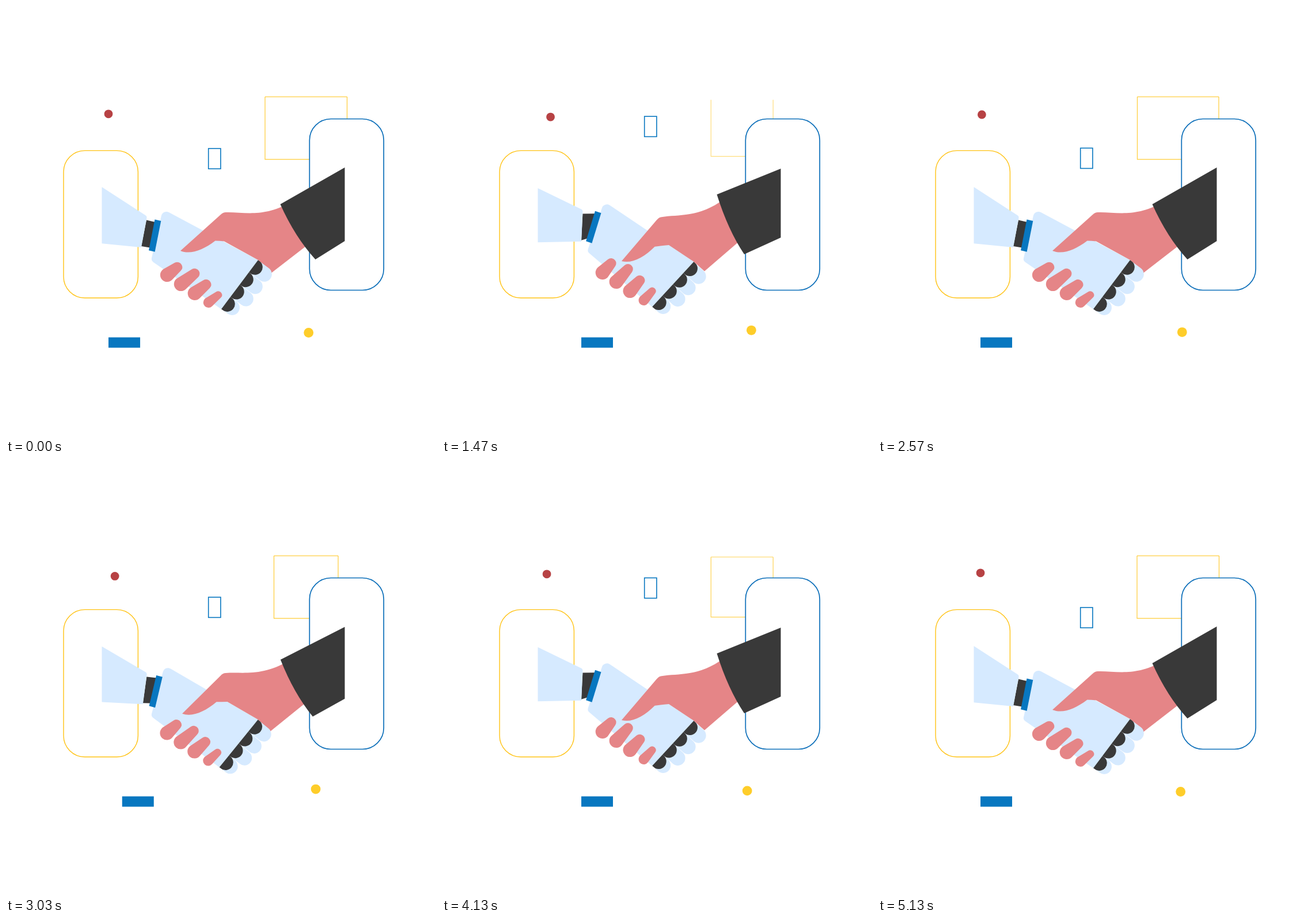
Recreate the animation shown at these times as an HTML page with a canvas. Size 747 px wide and 750 px high, loop 5.21 s.

```html
<!DOCTYPE html>
<html lang="en">
<head>
<meta charset="utf-8">
<title>Handshake</title>
<style>
html, body { margin: 0; width: 100%; height: 100%; overflow: hidden; background: #fff; }
canvas { display: block; width: 747px; height: 750px; }
</style>
</head>
<body>
<canvas id="stage" width="747" height="750"></canvas>
<script>
const ctx = document.getElementById('stage').getContext('2d');
const LOOP = 5210, FPS = 30, LAST = 154;
const LIGHT = '#d6eaff', DARK = '#393939', SKIN = '#e58587';
const BLUE = '#0877c0', LINE = '#0b6eb9', GOLD = '#ffc315';

const ramp = (f, start, length) => {
  const s = Math.min(1, Math.max(0, (f - start) / length));
  return s * s * (3 - 2 * s);
};

// Two identical swings: up from `rise`, back down from `fall`, then rest.
function swing(f, period, rise, riseTime, fall, fallTime) {
  if (f >= 2 * period) return 0;
  const g = f % period;
  return ramp(g, rise, riseTime) - ramp(g, fall, fallTime);
}

// Returns a function that turns a point about a pivot.
function turner(cx, cy, angle) {
  const c = Math.cos(angle), s = Math.sin(angle);
  return (x, y) => [cx + (x - cx) * c - (y - cy) * s, cy + (x - cx) * s + (y - cy) * c];
}

function fill(color) {
  ctx.closePath();
  ctx.fillStyle = color;
  ctx.fill();
}

function poly(color, ...pts) {
  ctx.beginPath();
  pts.forEach(p => ctx.lineTo(...p));
  fill(color);
}

function disc(x, y, r, color) {
  ctx.beginPath();
  ctx.arc(x, y, r, 0, Math.PI * 2);
  fill(color);
}

// Two circles and the straight sides that join them.
function capsule(x, y, r, angle, length, tip, color) {
  const b = Math.acos((r - tip) / length);
  ctx.beginPath();
  ctx.arc(x, y, r, angle + b, angle - b + Math.PI * 2);
  ctx.arc(x + length * Math.cos(angle), y + length * Math.sin(angle), tip, angle - b, angle + b);
  fill(color);
}

function panel(x, y, w, h, color, width) {
  ctx.beginPath();
  ctx.roundRect(x, y, w, h, 37);
  ctx.fillStyle = '#fff';
  ctx.fill();
  ctx.strokeStyle = color;
  ctx.lineWidth = width;
  ctx.stroke();
}

function goldBox(narrow, flat) {
  const dx = 17.3 * narrow, dy = 5.3 * flat;
  const l = 450 + dx, r = 592.5 - dx, t = 158 + dy, b = 266.9 - dy;
  ctx.strokeStyle = GOLD;
  ctx.lineWidth = 1.2;
  ctx.globalAlpha = 0.85 - 0.3 * flat;
  ctx.beginPath();
  ctx.moveTo(l, t);
  ctx.lineTo(l, b);
  ctx.lineTo(r, b);
  ctx.lineTo(r, t);
  ctx.stroke();
  ctx.globalAlpha = 1 - flat;
  ctx.beginPath();
  ctx.moveTo(l, t);
  ctx.lineTo(r, t);
  ctx.stroke();
  ctx.globalAlpha = 1;
}

function robotArm(p, palm) {
  const fore = turner(166, 364, -0.14 * p);
  poly(DARK, fore(244, 372.5), palm(259, 376), palm(250, 420.5), fore(235, 418));

  ctx.beginPath();
  ctx.moveTo(166.5, 315 + 2 * p);
  ctx.arcTo(...fore(245, 366), ...fore(235, 420), 4);
  ctx.lineTo(...fore(235, 420));
  ctx.lineTo(166.5, 413.3 - 2 * p);
  fill(LIGHT);

  const top = palm(438, 442), heel = palm(374, 527.5), low = palm(252, 443), high = palm(272.5, 353.5);
  ctx.beginPath();
  ctx.moveTo(...top);
  ctx.lineTo(...heel);
  ctx.arcTo(...low, ...high, 7);
  ctx.arcTo(...high, ...top, 9);
  fill(LIGHT);

  poly(BLUE, palm(258.5, 371.5), palm(269.3, 374), palm(258.6, 427.8), palm(248, 425.3));
}

function humanArm(p, palm) {
  const a = turner(444, 367, -0.131 * p);
  ctx.beginPath();
  ctx.moveTo(...a(303, 426));
  ctx.lineTo(...a(373, 363));
  ctx.quadraticCurveTo(...a(377, 359), ...a(382, 359));
  ctx.bezierCurveTo(...a(412, 358), ...a(446, 369), ...a(494, 342));
  ctx.lineTo(521 - 7 * p, 418 - 6.5 * p);
  ctx.lineTo(461 - 5 * p, 464.5 - 3 * p);
  ctx.lineTo(...palm(438, 442));
  ctx.lineTo(379 + 15 * p, 409.6 + 6.4 * p);
  ctx.quadraticCurveTo(...a(371, 408.6), ...a(363.5, 408.5));
  ctx.bezierCurveTo(...a(342, 425), ...a(320, 433), ...a(303, 426));
  fill(SKIN);

  ctx.beginPath();
  ctx.moveTo(476.5 + p, 345 - 17 * p);
  ctx.lineTo(588.5, 281 + 2 * p);
  ctx.lineTo(588.5, 409 - 6 * p);
  ctx.lineTo(537.5 - 12.5 * p, 441 - 9 * p);
  ctx.quadraticCurveTo(502 - 5 * p, 402 - 12 * p, 476.5 + p, 345 - 17 * p);
  fill(DARK);
}

function robotFingers(palm) {
  const [x0, y0] = palm(438, 442), [x1, y1] = palm(374, 527.5);
  const dx = x1 - x0, dy = y1 - y0, r = Math.hypot(dx, dy) / 8;
  const out = Math.atan2(-dx, dy);
  const row = (length, size, color) => {
    for (let k = 1; k < 8; k += 2) {
      capsule(x0 + dx * k / 8, y0 + dy * k / 8, size, out, length(k), size, color);
    }
  };
  row(k => k < 7 ? 23.5 : 13.6, 13, LIGHT);

  const fx = 40 * Math.cos(out), fy = 40 * Math.sin(out);
  ctx.save();
  ctx.beginPath();
  ctx.moveTo(x0, y0);
  ctx.lineTo(x0 + fx, y0 + fy);
  ctx.lineTo(x1 + fx, y1 + fy);
  ctx.lineTo(x1, y1);
  ctx.clip();
  row(() => 3, r, DARK);
  ctx.restore();
}

function humanFingers(p) {
  const angle = -0.66 - 0.17 * p;
  [22, 30, 25, 21.5].forEach((length, i) => {
    const r = i < 3 ? 12.1 : 9;
    capsule(280 + 23.9 * i - 1.2 * p, 468 + 16 * i - 4 * p, r, angle, length, r * 0.73, SKIN);
  });
}

function draw(f) {
  const p = swing(f + 0.4, 79, 0, 30, 45.4, 30);
  const drift = swing(f, 69, 0, 30, 34, 33);
  const lift = swing(f, 74, 0, 45, 45, 29);
  const narrow = swing(f, 75, 0, 20, 54, 20);
  const flat = swing(f, 75, 20, 8, 44, 9);
  const palm = turner(409, 438, 0.101 * p);

  ctx.fillStyle = '#fff';
  ctx.fillRect(0, 0, 747, 750);
  goldBox(narrow, flat);
  panel(100, 251.6, 129.4, 256.4, GOLD, 1.4);
  panel(527.3, 196.5, 128.9, 298, LINE, 1.7);

  ctx.strokeStyle = BLUE;
  ctx.lineWidth = 1.6;
  ctx.strokeRect(351.7, 248 - 56 * lift, 21.2, 35.3);
  ctx.fillStyle = BLUE;
  ctx.fillRect(178 + 64 * p, 576.6, 55, 18);
  disc(178 + 13.5 * drift, 187.8 + 6.8 * drift, 7.4, '#b74244');
  disc(525.7 + 15 * drift, 568.5 - 5.4 * drift, 8.4, '#fecd2a');

  robotArm(p, palm);
  humanArm(p, palm);
  robotFingers(palm);
  humanFingers(p);
}

const start = performance.now();
function tick(now) {
  const t = Math.max(0, now - start) % LOOP;
  draw(Math.min(LAST, Math.floor((t + 5) * FPS / 1000)));
  requestAnimationFrame(tick);
}
draw(0);
requestAnimationFrame(tick);
</script>
</body>
</html>
```
